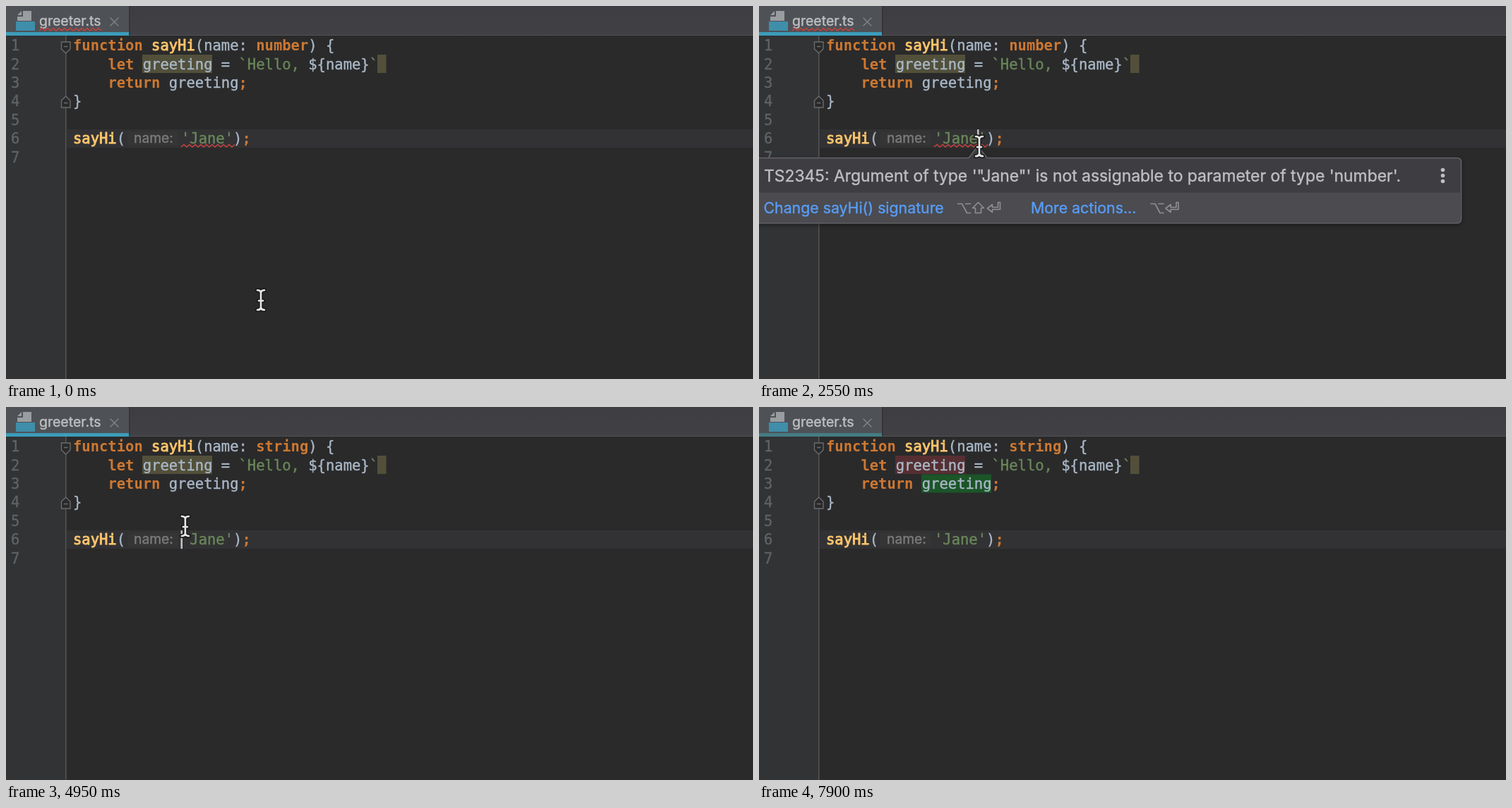
Recreate the animation shown at these times as an HTML page. Size 1058 by 529 pixels, loop 8000 ms.

```html
<!DOCTYPE html>
<html lang="en">
<head>
<meta charset="utf-8">
<title>Editor quick fixes</title>
<style>
  html, body { margin: 0; width: 100%; height: 100%; overflow: hidden; background: #2a2a2b; }
  svg { display: block; width: 100%; height: 100%; }
  text, tspan { fill: var(--ink); stroke: var(--ink); }
  text { white-space: pre; stroke-width: .4; }
  .code { font: 20.5px "DejaVu Sans Mono", monospace; --ink: #a9b7c6; }
  .key { --ink: #cc7832; font-weight: bold; stroke-width: 0; }
  .fn { --ink: #ffc66d; stroke-width: .9; }
  .str { --ink: #6a8759; }
  .num { --ink: #606366; }
  .ui { font-family: Inter, sans-serif; --ink: #bfbfc1; fill: var(--ink); }
  .hint { --ink: #7b7b7c; }
  .title { font-size: 22.9px; }
  .link { font-size: 21.3px; --ink: #589df6; }
  .line { fill: none; stroke-linecap: round; stroke-linejoin: round; }
  .error { fill: none; stroke: #c8423e; stroke-width: 1.5; }
  .fold { fill: #2a2a2b; stroke: #6a6b6d; stroke-width: 1.4; }
</style>
</head>
<body>
<svg viewBox="0 0 1058 529">
  <defs>
    <linearGradient id="bar" x2="0" y2="1"><stop stop-color="#3e3d42"/><stop offset="1" stop-color="#414045"/></linearGradient>
    <filter id="shadow" x="-10%" y="-20%" width="120%" height="150%">
      <feDropShadow dx="0" dy="2" stdDeviation="3" flood-opacity=".4"/>
    </filter>
    <path id="option" d="M1 3h6l7 13h5M12 3h7"/>
    <path id="shift" d="M9 1l8 8h-4v7h-8v-7h-4z"/>
    <path id="enter" d="M16 1h3v10h-11v4l-7-5.500 7-5.500v4h8z"/>
    <path id="beamShape" d="M-5 -14q4 0 5 3q1 -3 5 -3M0 -11v22M-5 14q4 0 5 -3q1 3 5 3M-3 1h6"/>
  </defs>

  <!-- editor frame -->
  <path fill="#313335" d="M0 42h85v487H0z"/>
  <path fill="#323234" d="M86 175h972v26H86z"/>
  <path fill="#555557" d="M84 42h1.500v487h-1.500z"/>
  <path fill="url(#bar)" d="M0 0h1058v41H0z"/>
  <path fill="#515153" d="M0 41h1058v1H0z"/>
  <path fill="#4e5257" d="M0 0h174v38H0z"/>
  <path fill="#333337" d="M174 0h1.500v41h-1.500z"/>
  <path id="tabLine" d="M0 37h174v5H0z"/>
  <path fill="#9a9da0" d="M24 7h12v14H16v-6h8zM22 7v6h-6z"/>
  <path fill="#3f8eaa" d="M14 22h27v13H14z"/>
  <text class="ui" x="47" y="28" font-size="19.500">greeter.ts</text>
  <path class="line" stroke="#7e8184" stroke-width="1.500" d="M148 17l11 11M159 17l-11 11"/>

  <g id="numbers" class="code"></g>

  <!-- code -->
  <path id="declaration" d="M193 69h99v26h-99z"/>
  <path id="usage" fill="#1b5528" d="M230 95.500h99v26h-99z"/>
  <path fill="#52503a" d="M526 69h12.500v26H526z"/>
  <rect x="172" y="178" width="72" height="20" rx="4" fill="#353536"/>
  <g class="code">
    <text x="95" y="63"><tspan class="key">function</tspan> <tspan class="fn">sayHi</tspan>(name: <tspan class="key" id="type">number</tspan>) {</text>
    <text x="95" y="89.500">    <tspan class="key">let</tspan> greeting = <tspan class="str">`Hello, </tspan>${name}<tspan class="str">`</tspan></text>
    <text x="95" y="116">    <tspan class="key">return</tspan> greeting<tspan class="key">;</tspan></text>
    <text x="95" y="142">}</text>
    <text x="95" y="195"><tspan class="fn">sayHi</tspan>(</text>
    <text x="248" y="195"><tspan class="str">'Jane'</tspan>)<tspan class="key">;</tspan></text>
  </g>
  <text class="ui hint" x="181" y="194" font-size="19.300">name:</text>
  <path class="fold" d="M78.500 51h12.500v10l-6.250 6-6.250-6zM82 57.500h5.500"/>
  <path class="fold" d="M78.500 144h12.500v-10l-6.250-6-6.250 6zM82 137.500h5.500"/>
  <g id="errors" class="error"></g>
  <path id="caret" fill="#c4c4c4" d="M0 175h2.500v26H0z"/>

  <g id="popups"></g>

  <g id="beam" class="line">
    <use href="#beamShape" stroke="#1b1b1b" stroke-width="6"/>
    <use href="#beamShape" stroke="#e6e6e6" stroke-width="2.600"/>
  </g>
  <path id="arrow" fill="#101010" stroke="#e8e8e8" stroke-width="1.400" stroke-linejoin="round"
    d="M0 0v25.500l6-5 4.500 11 4.500-2-4.500-10.500h7.500z"/>
</svg>

<script>
const LOOP = 8000, STEP = 50;
const $ = id => document.getElementById(id);
const show = (id, on) => $(id).setAttribute('visibility', on ? 'visible' : 'hidden');
const place = (id, x, y) => $(id).setAttribute('transform', `translate(${x} ${y})`);

const wave = (x, y, width) => {
  let d = `M${x} ${y}`;
  for (let i = 0; i < width / 4; i++) d += `l4 ${i % 2 ? 3.5 : -3.5}`;
  return `<path d="${d}"/>`;
};

function popup(id, { x, y, width, tip, title, fix, fixKeys, more, moreKeys }) {
  const right = x + width, mid = y + 49, bottom = y + 92.5;
  const outline = `M${x + 6} ${y}H${tip - 13}L${tip} ${y - 17}L${tip + 13} ${y}H${right - 6}q6 0 6 6` +
    `V${bottom - 6}q0 6 -6 6H${x + 6}q-6 0 -6 -6V${y + 6}q0 -6 6 -6z`;
  const footer = `M${x + 1} ${mid}H${right - 1}V${bottom - 6}q0 5 -5 5H${x + 6}q-5 0 -5 -5z`;
  const keys = (names, left) => names.map((name, i) =>
    `<use href="#${name}" x="${left + i * 21}" y="${y + 62}"/>`).join('');
  const dots = [17, 25, 33].map(dy => `<circle cx="${right - 26}" cy="${y + dy}" r="2.8"/>`).join('');
  return `<g id="${id}" class="ui">
    <path d="${outline}" fill="#3e3e42" stroke="#626266" stroke-width="1.5" filter="url(#shadow)"/>
    <path d="${footer}" fill="#4b4b50"/>
    <text class="title" x="${x + 14}" y="${y + 33}">${title}</text>${dots}
    <text class="link" id="${id}Fix" x="${x + 13.5}" y="${y + 78}">${fix}</text>
    <text class="link" x="${more}" y="${y + 78}">More actions...</text>
    <g class="line" stroke="#8f8f93" stroke-width="1.6">
      ${keys(['option', 'shift', 'enter'], fixKeys)}${keys(['option', 'enter'], moreKeys)}
    </g></g>`;
}

$('numbers').innerHTML = [1, 2, 3, 4, 5, 6, 7]
  .map(n => `<text class="num" x="7" y="${36.8 + n * 26.4}">${n}</text>`).join('');
$('errors').innerHTML = wave(47, 35, 87) + wave(248, 200, 74);
$('popups').innerHTML =
  popup('typePopup', {
    x: -7, y: 215.5, width: 1001.5, tip: 310, fixKeys: 280.5, more: 385, moreKeys: 554,
    title: `TS2345: Argument of type '"Jane"' is not assignable to parameter of type 'number'.`,
    fix: 'Change sayHi() signature'
  }) +
  popup('inlinePopup', {
    x: 31, y: 109.5, width: 520.5, tip: 293, fixKeys: 202.5, more: 307.5, moreKeys: 476.5,
    title: `Local variable 'greeting' is redundant`, fix: 'Inline variable'
  });

// Pointer strokes: quadratic curves with eased progress.
const strokes = [
  { start: 900, end: 1750, from: [361, 417], via: [336, 308], to: [312, 199] },
  { start: 2750, end: 3550, from: [312, 199], via: [284, 267], to: [200, 284] },
  { start: 4250, end: 5600, from: [200, 284], via: [255, 170], to: [295, 75] },
  { start: 5850, end: 5900, from: [295, 75], via: [293, 76], to: [291.5, 76.5] },
  { start: 6950, end: 7800, from: [292, 79], via: [240, 150], to: [120, 172] }
];
function pointerAt(t) {
  const s = strokes.findLast(s => t >= s.start) || strokes[0];
  const u = Math.min(1, Math.max(0, (t - s.start) / (s.end - s.start)));
  const k = u * u * (3 - 2 * u);
  return [0, 1].map(i => (1 - k) ** 2 * s.from[i] + 2 * k * (1 - k) * s.via[i] + k * k * s.to[i]);
}

function draw(t) {
  const within = (a, b) => t >= a && t < b;
  const fixed = t >= 4250, previewing = t >= 7900;
  const [x, y] = pointerAt(t);
  const arrow = within(2800, 4250) || within(7000, 7850);

  $('type').textContent = fixed ? 'string' : 'number';
  show('errors', !fixed);
  show('caret', within(550, 7850) && (t - 550) % 1000 < 500);
  place('caret', fixed ? 247.5 : 309, 0);

  show('typePopup', within(1950, 4250));
  show('inlinePopup', within(5700, 7850));
  $('typePopupFix').style.textDecoration = y > 272 && arrow ? 'underline' : '';
  $('inlinePopupFix').style.textDecoration = y > 166 && x < 184 && arrow ? 'underline' : '';

  $('tabLine').setAttribute('fill', t < 7850 ? '#3c9cba' : '#457c84');
  $('declaration').setAttribute('fill', previewing ? '#562f32' : '#52503a');
  show('usage', previewing);

  show('arrow', arrow);
  show('beam', !arrow && !within(4250, 4300) && t < 7850);
  place('arrow', x, y);
  place('beam', x, y);
}

function tick(now) {
  draw(Math.floor(now % LOOP / STEP) * STEP);
  requestAnimationFrame(tick);
}
draw(0);
requestAnimationFrame(tick);
</script>
</body>
</html>
```
